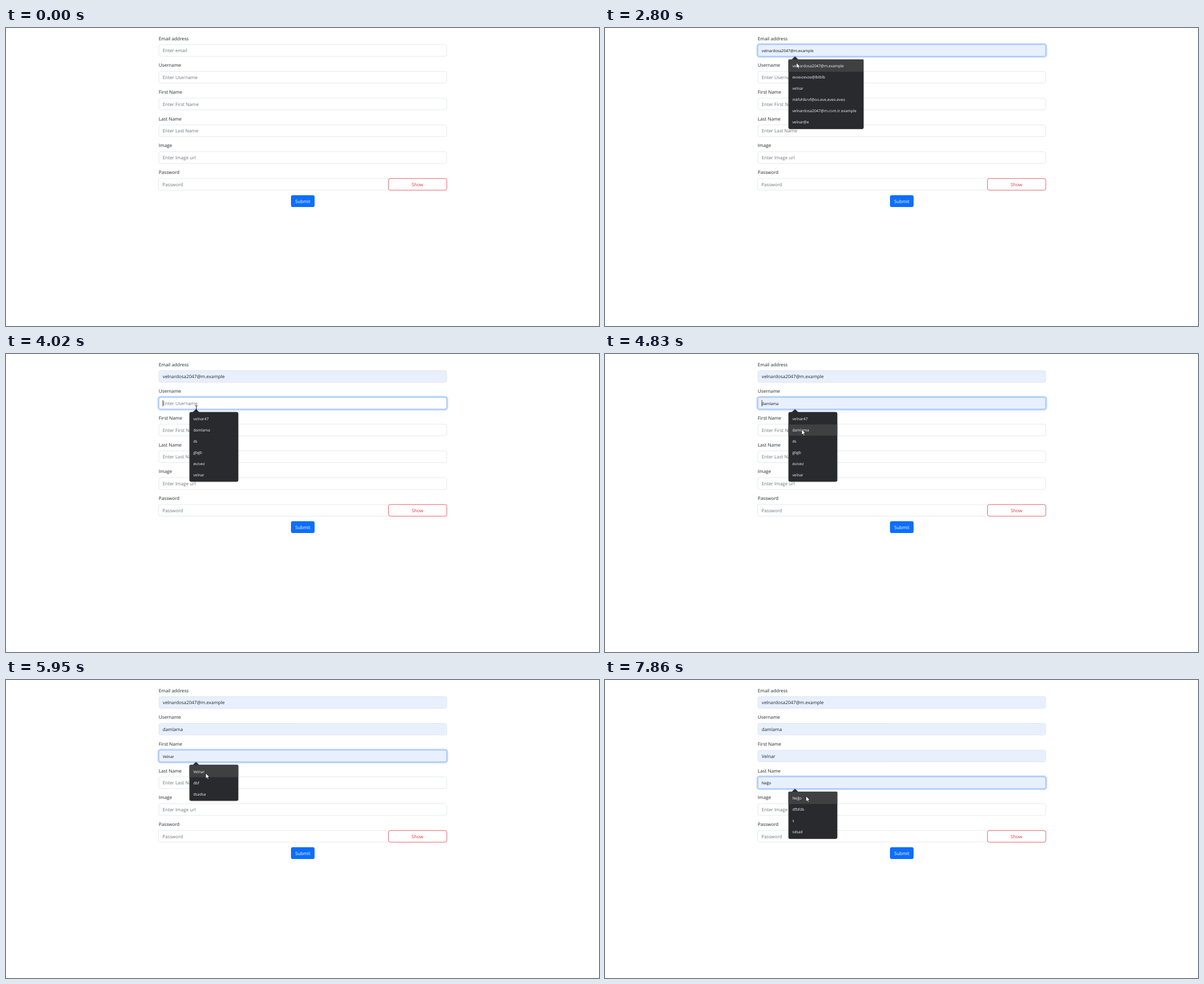
These frames come from a looping animation (1055x531 px, 8000 ms). An HTML page:

```html
<!DOCTYPE html>
<html lang="en">
<head>
<meta charset="utf-8">
<title>Sign-up form</title>
<style>
  html, body { margin: 0; width: 100%; height: 100%; overflow: hidden; background: #fff; }
  svg { display: block; width: 100%; height: 100%; }
  text { font: 8.2px "Open Sans", "Noto Sans", sans-serif; fill: #212529; text-rendering: geometricPrecision; white-space: pre; }
  .placeholder { fill: #6c757d; }
  .box { fill: #fff; stroke: #dee2e6; stroke-width: .8; }
  .box.filled { fill: #e8f0fe; }
  .ring { fill: none; stroke: #0d6efd; stroke-opacity: .25; stroke-width: 2.4; }
  .edge { fill: none; stroke: #86b7fe; stroke-width: .8; }
  .caret { stroke: #000; stroke-width: .8; }
  text.preview { font-size: 6.85px; fill: #111; }
  .popup { filter: drop-shadow(0 .6px .8px rgba(0, 0, 0, .4)); }
  .panel { fill: #292a2d; }
  .hover { fill: #3f4042; }
  .popup text { font-size: 6.8px; fill: #f1f3f4; }
  .tip text { font-size: 6.25px; fill: #fff; }
</style>
</head>
<body>
<svg id="stage" viewBox="0 0 1055 531" preserveAspectRatio="none"></svg>
<script>
const LOOP = 8000, PITCH = 47.7, BLINK = 530, FADE = 150;
const stage = document.getElementById('stage');

// Screen refreshes: first time, last time, number of steps
const bursts = [
  [0, 0, 1], [580, 1280, 8], [1400, 1600, 3], [2090, 2890, 9], [3010, 3520, 6], [3720, 4520, 9],
  [4620, 4620, 1], [4830, 5560, 8], [5660, 5950, 4], [6360, 6940, 7], [7180, 7860, 8]
];

// Pointer stops: time, x, y
const stops = [
  [580, 936, 518], [1280, 341, 77.6], [1400, 341, 77.6], [1600, 327.5, 43.7],
  [2290, 327.5, 43.7], [2700, 340.5, 62], [3010, 340.5, 62], [3420, 336, 88],
  [3820, 336, 88], [4520, 349, 131.5], [4620, 350, 134.5], [5450, 350, 134.5],
  [5950, 355.3, 166], [6450, 355.3, 166], [6840, 354, 184], [7280, 354, 184], [7760, 357.7, 207]
];

const fields = [
  { label: 'Email address', hint: 'Enter email', focus: 2190, open: 2290, commit: 2890, close: 3010, blur: 3720, pick: 0, width: 133.5,
    options: ['velnardosa2047@m.example', 'evzevzevze@lblblb', 'velnar', 'mkfvhlkrvf@oo.eve.eveo.eveo', 'velnardosa2047@m.com.tr.example', 'velnar@e'] },
  { label: 'Username', hint: 'Enter Username', focus: 3720, open: 3820, commit: 4930, close: 5030, blur: 5350, pick: 1, width: 86.7,
    options: ['velnar47', 'damlama', 'ds', 'gbgb', 'evzvez', 'velnar'] },
  { label: 'First Name', hint: 'Enter First Name', focus: 5350, open: 5450, commit: 6360, close: 6450, blur: 7180, pick: 0, width: 86.7,
    options: ['Velnar', 'dbf', 'dsadsa'] },
  { label: 'Last Name', hint: 'Enter Last Name', focus: 7180, open: 7280, commit: 9000, close: 9000, blur: 9000, pick: 0, width: 86.7,
    options: ['Neğo', 'dfbfdb', 's', 'sdsad'] },
  { label: 'Image', hint: 'Enter Image url' },
  { label: 'Password', hint: 'Password' }
];

function add(parent, tag, attrs, content) {
  const node = document.createElementNS('http://www.w3.org/2000/svg', tag);
  for (const key in attrs) node.setAttribute(key, attrs[key]);
  if (content) node.textContent = content;
  return parent.appendChild(node);
}
const rect = (parent, x, y, width, height, rx, attrs) =>
  add(parent, 'rect', { x, y, width, height, rx, ...attrs });
const write = (parent, x, y, content, attrs) => add(parent, 'text', { x, y, ...attrs }, content);
const show = (node, visible) => node.setAttribute('visibility', visible ? 'visible' : 'hidden');

function buildField(field, i) {
  const y = 29.6 + PITCH * i;
  field.top = y;
  write(stage, 271.8, y - 8.1, field.label);
  if (!field.options) {
    if (field.label === 'Password') {
      add(stage, 'path', { class: 'box', d: `M680 ${y}H274.5Q271.5 ${y} 271.5 ${y + 3}V${y + 17.8}Q271.5 ${y + 20.8} 274.5 ${y + 20.8}H680` });
    } else {
      rect(stage, 272, y, 512, 20.8, 3.2, { class: 'box' });
    }
    write(stage, i === 5 ? 278.3 : 278.8, y + 13.6, field.hint, { class: 'placeholder' });
    return;
  }
  field.box = rect(stage, 272, y, 512, 20.8, 3.2, { class: 'box' });
  field.glow = add(stage, 'g', {});
  rect(field.glow, 270.6, y - 1.4, 514.8, 23.6, 4.4, { class: 'ring' });
  rect(field.glow, 272, y, 512, 20.8, 3.2, { class: 'edge' });
  field.text = write(stage, 278.8, y + 13.6, field.hint);
  field.caret = add(stage, 'line', { class: 'caret', y1: y + 5, y2: y + 16 });
}

function buildPopup(field) {
  const top = field.top + 26.3, height = field.options.length * 20 + 4;
  field.popTop = top;
  field.popBottom = top + height;
  field.popup = add(stage, 'g', { class: 'popup' });
  add(field.popup, 'path', { class: 'panel', d: `M332 ${top + .5}l6 -5.6l6 5.6z` });
  rect(field.popup, 326.5, top, field.width, height, 3, { class: 'panel' });
  field.hover = rect(field.popup, 326.5, top, field.width, 20, 1.5, { class: 'hover' });
  field.options.forEach((option, r) => write(field.popup, 333.2, top + 14.4 + 20 * r, option));
}

fields.forEach(buildField);
rect(stage, 680.4, 268.2, 103.8, 20.8, 3.2, { fill: '#fff', stroke: '#dc3545', 'stroke-width': .8 });
write(stage, 732, 281.8, 'Show', { 'text-anchor': 'middle', style: 'fill:#dc3545' });
rect(stage, 507, 298, 42, 21, 3.2, { fill: '#0d6efd' });
write(stage, 528, 311.7, 'Submit', { 'text-anchor': 'middle', style: 'fill:#fff' });

const suggesting = fields.filter(field => field.options);
suggesting.forEach(buildPopup);

const tip = add(stage, 'g', { class: 'tip' });
rect(tip, 332.3, 52.3, 81.4, 12.4, 0, { fill: '#2b2b2b', stroke: '#1c1c1c', 'stroke-width': .6 });
write(tip, 336, 60.8, 'Lütfen bu alanı doldurun.');

const arrow = add(stage, 'path', {
  d: 'M0 0V9.6L2.2 7.6L3.7 11L5.2 10.3L3.7 7H6.7Z', fill: '#fff', stroke: '#000', 'stroke-width': .55
});
const beam = add(stage, 'path', {
  d: 'M-2.2 -4.5H-.6L0 -4L.6 -4.5H2.2M0 -4V4M-2.2 4.5H-.6L0 4L.6 4.5H2.2', fill: 'none', stroke: '#000', 'stroke-width': .9
});

function refreshTime(t) {
  const [start, end, steps] = bursts.filter(burst => burst[0] <= t).pop();
  if (steps === 1) return start;
  const gap = (end - start) / (steps - 1);
  return start + gap * Math.min(steps - 1, Math.floor((t - start) / gap + .01));
}

function pointerAt(t) {
  const next = stops.findIndex(stop => stop[0] > t);
  if (next < 0) return stops[stops.length - 1].slice(1);
  if (next === 0) return stops[0].slice(1);
  const [t0, x0, y0] = stops[next - 1], [t1, x1, y1] = stops[next];
  const p = (t - t0) / (t1 - t0), ease = p * p * (3 - 2 * p);
  return [x0 + (x1 - x0) * ease, y0 + (y1 - y0) * ease];
}

function drawField(field, t, x, y) {
  const open = t >= field.open && t < field.close;
  const inside = open && y >= field.popTop && y < field.popBottom;
  const row = inside ? Math.min(field.options.length - 1, Math.max(0, Math.floor((y - field.popTop - 2) / 20))) : -1;
  const done = t >= field.commit, preview = inside && !done;
  const focused = t >= field.focus && t < field.blur;

  show(field.popup, open);
  show(field.hover, inside);
  if (inside) {
    const lead = row ? 0 : 2;
    field.hover.setAttribute('y', field.popTop + 2 + 20 * row - lead);
    field.hover.setAttribute('height', 20 + lead);
  }

  field.box.setAttribute('class', done || preview ? 'box filled' : 'box');
  field.text.textContent = done ? field.options[field.pick] : preview ? field.options[row] : field.hint;
  field.text.setAttribute('class', done ? '' : preview ? 'preview' : 'placeholder');

  const fade = Math.min(1, (t - field.focus + 50) / FADE) - Math.max(0, (t - field.blur + 50) / FADE);
  field.glow.setAttribute('opacity', Math.min(1, Math.max(0, fade)));

  const since = t - (done ? field.commit : field.focus);
  const caretOn = focused && since % (2 * BLINK) < BLINK;
  show(field.caret, caretOn);
  if (caretOn) {
    const at = 279.2 + (done ? field.text.getComputedTextLength() : 0);
    field.caret.setAttribute('x1', at);
    field.caret.setAttribute('x2', at);
  }
  return inside;
}

function draw(now) {
  const t = refreshTime(now % LOOP);
  const [x, y] = pointerAt(t);
  const overPopup = suggesting.map(field => drawField(field, t, x, y)).includes(true);
  const overField = x > 272 && x < 784 && fields.some(field => y >= field.top && y <= field.top + 20.8);
  const typing = overField && !overPopup, present = t >= 580;
  show(tip, t >= 2090 && t < 2190);
  show(arrow, present && !typing);
  show(beam, present && typing);
  (typing ? beam : arrow).setAttribute('transform', `translate(${x} ${y})`);
}

const begin = performance.now();
function tick() {
  draw(performance.now() - begin);
  requestAnimationFrame(tick);
}
tick();
</script>
</body>
</html>
```
